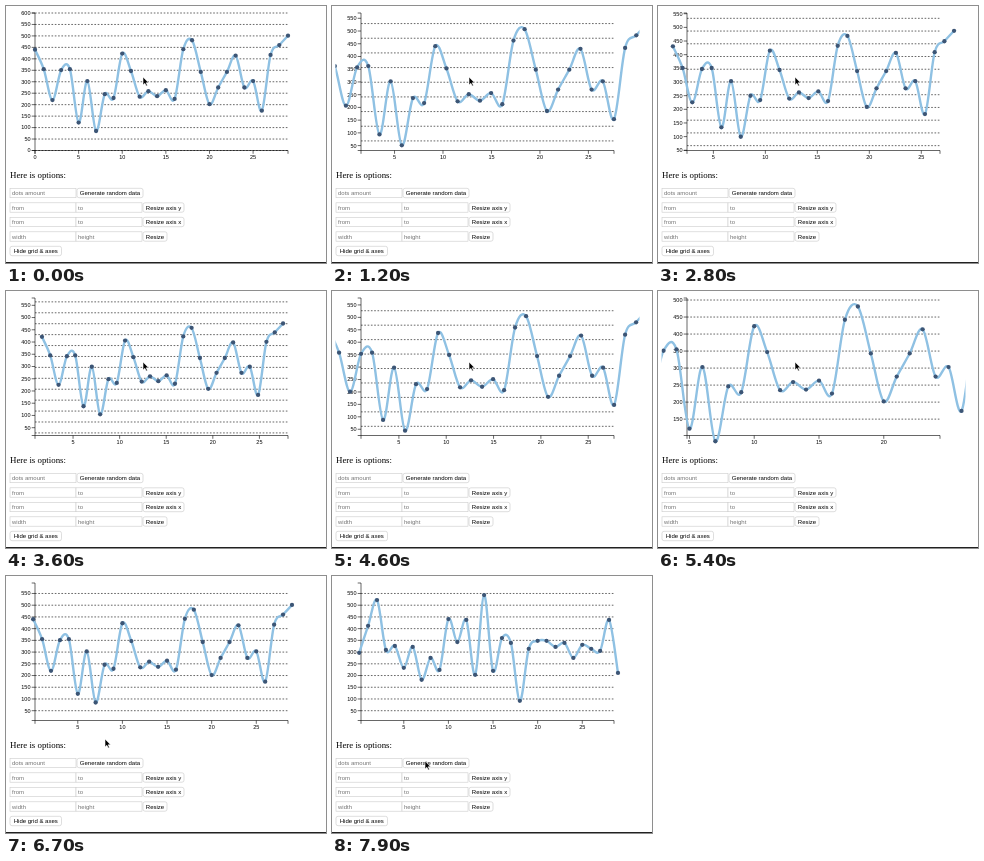
An HTML page for the animation above (8 s loop, 320 by 257 pixels).

```html
<!DOCTYPE html>
<html lang="en">
<head>
<meta charset="utf-8">
<title>Zoomable line chart</title>
<style>
  html, body { margin: 0; width: 100%; height: 100%; overflow: hidden; background: #fff; }
  svg { display: block; width: 100vw; height: 100vh; }
  text { font: 6px "Liberation Sans", Arial, sans-serif; }
  .heading { font: 8.85px "Liberation Serif", Times, serif; }
  .tick { font-size: 5.5px; }
  .input { fill: #fff; stroke: #ccc; stroke-width: .6; }
  .button { fill: #fff; stroke: #c8c8c8; stroke-width: .6; }
  .button.pressed { fill: #d4d4d4; }
  .placeholder { fill: #757575; }
  .grid { stroke: #000; stroke-width: .6; stroke-dasharray: 1.65 1.65; }
  .axis { fill: none; stroke: #000; stroke-width: .6; }
  .curve { fill: none; stroke: #8fc1e3; stroke-width: 2.4; }
  .dot { fill: #3c5575; }
</style>
</head>
<body>
<svg viewBox="0 0 320 257" preserveAspectRatio="none">
  <clipPath id="frame"><rect x="3.5" y="3" width="304" height="151"/></clipPath>
  <text class="heading" x="4" y="172">Here is options:</text>
  <g id="form"></g>
  <g id="chart" clip-path="url(#frame)"></g>
  <path id="cursor" d="M0 0V8L1.9 6.3L3.2 9L4.4 8.5L3.2 5.8H5.6Z" stroke="#fff" stroke-width=".6"/>
  <rect y="256" width="320" height="1" fill="#222"/>
</svg>
<script>
const LOOP = 8000, STEP = 100;
const LEFT = 29, RIGHT = 282, TOP = 7, BOTTOM = 144.5;
const X_MAX = 29, Y_MAX = 600;

const firstData = [440, 355, 220, 351, 355, 122, 303, 85, 246, 229, 423, 347, 235, 259, 237,
  263, 225, 442, 481, 343, 202, 275, 343, 414, 275, 303, 174, 417, 460, 501];
const lastData = [297, 412, 522, 309, 326, 233, 322, 182, 275, 224, 441, 343, 437, 203, 543,
  220, 360, 339, 92, 314, 348, 348, 322, 339, 275, 331, 314, 305, 437, 211];
const middleData = firstData.map((_, i) => 310 + 130 * Math.sin(i * i * 1.7 + 1) + 70 * Math.sin(i * 2.3));

// Keys: time, scale, x shift, y shift. The axes trail behind the curve and grid.
const plotZoom = [
  [500, 1, 0, 0], [1500, 1.4, -65, -29.6], [2000, 1.334, -54, -24.6], [3200, 1, 1, 0],
  [3600, .953, 8.3, 4.2], [3900, .97, 5.5, 2.8], [4600, 1.261, -40.5, -18],
  [5100, 1.485, -76.4, -35.4], [5500, 1.485, -76.4, -35.4], [6300, 1.023, -2.5, -1.4]
];
const axisZoom = [
  [500, 1, 0, 0], [2000, 1.238, -38.9, -17.6], [2500, 1.238, -38.9, -17.6],
  [3600, 1.068, -10.5, -5.4], [4600, 1.085, -11.9, -6.1],
  [5400, 1.485, -76.4, -35.4], [5500, 1.485, -76.4, -35.4], [6500, 1.023, -2.5, -1.4]
];
const cursorPath = [[6400, 137, 71], [6700, 99, 163], [7100, 93, 185]];

const form = document.getElementById('form');
const chart = document.getElementById('chart');
const cursor = document.getElementById('cursor');

function sample(keys, t) {
  const next = keys.findIndex(key => key[0] > t);
  if (next === 0) return keys[0].slice(1);
  if (next < 0) return keys[keys.length - 1].slice(1);
  const a = keys[next - 1], b = keys[next];
  const p = (t - a[0]) / (b[0] - a[0]);
  return a.slice(1).map((v, i) => v + (b[i + 1] - v) * p);
}

function scales([k, dx, dy]) {
  return {
    x: v => (LEFT + v / X_MAX * (RIGHT - LEFT)) * k + dx,
    y: v => (BOTTOM - v / Y_MAX * (BOTTOM - TOP)) * k + dy
  };
}

function ticks(scale, step, max, low, high) {
  const result = [];
  for (let v = 0; v <= max; v += step) {
    const at = scale(v);
    if (at >= low - .1 && at <= high + .1) result.push([v, at]);
  }
  return result;
}

// Cardinal spline with zero tension
function curve(points) {
  const at = i => points[Math.max(0, Math.min(points.length - 1, i))];
  const control = (i, sign) => at(i).map((v, c) => v + sign * (at(i + 1)[c] - at(i - 1)[c]) / 6);
  return 'M' + points[0] + points.slice(1)
    .map((p, i) => `C${control(i, 1)} ${control(i + 1, -1)} ${p}`).join('');
}

function drawChart(data, plot, axis) {
  const points = data.map((v, i) => [plot.x(i), plot.y(v)]);
  const xTicks = ticks(axis.x, 5, 30, LEFT, RIGHT);
  const yTicks = ticks(axis.y, 50, Y_MAX, TOP, BOTTOM);
  let axes = `M${LEFT - 3.3} ${TOP}H${LEFT}V${BOTTOM}H${LEFT - 3.3}`
    + `M${LEFT} ${BOTTOM + 3.3}V${BOTTOM}H${RIGHT}v3.3`;
  let out = ticks(plot.y, 50, Y_MAX, TOP, BOTTOM)
    .map(([, y]) => `<path class="grid" d="M${LEFT} ${y}H${RIGHT}"/>`).join('');
  for (const [v, x] of xTicks) {
    axes += `M${x} ${BOTTOM}v3.3`;
    out += `<text class="tick" x="${x}" y="153" text-anchor="middle">${v}</text>`;
  }
  for (const [v, y] of yTicks) {
    axes += `M${LEFT} ${y}h-3.3`;
    out += `<text class="tick" x="24.5" y="${y + 1.9}" text-anchor="end">${v}</text>`;
  }
  out += `<path class="axis" d="${axes}"/><path class="curve" d="${curve(points)}"/>`;
  out += points.map(([x, y]) => `<circle class="dot" cx="${x}" cy="${y}" r="2.15"/>`).join('');
  chart.innerHTML = out;
}

function input(x, y, label) {
  return `<rect class="input" x="${x}" y="${y - 4.7}" width="66" height="9.4"/>`
    + `<text class="placeholder" x="${x + 2}" y="${y + 2}">${label}</text>`;
}

function button(x, y, width, label) {
  return `<rect class="button" x="${x}" y="${y - 4.7}" width="${width}" height="9.4" rx="2"/>`
    + `<text x="${x + width / 2}" y="${y + 2}" text-anchor="middle">${label}</text>`;
}

form.innerHTML = input(4, 187, 'dots amount') + button(71, 187, 66, 'Generate random data')
  + input(4, 201.5, 'from') + input(70, 201.5, 'to') + button(137, 201.5, 41, 'Resize axis y')
  + input(4, 216, 'from') + input(70, 216, 'to') + button(137, 216, 41, 'Resize axis x')
  + input(4, 230.5, 'width') + input(70, 230.5, 'height') + button(137, 230.5, 24, 'Resize')
  + button(4, 245, 51.5, 'Hide grid &amp; axes');
const generate = form.querySelector('.button');

function render(t) {
  const data = t < 7500 ? firstData : t < 7900 ? middleData : lastData;
  drawChart(data, scales(sample(plotZoom, t)), scales(sample(axisZoom, t)));
  generate.classList.toggle('pressed', t === 7400 || t === 7800);
  cursor.setAttribute('transform', `translate(${sample(cursorPath, t)})`);
}

const start = performance.now();
function tick() {
  const t = (performance.now() - start) % LOOP;
  render(Math.floor(t / STEP) * STEP);
  requestAnimationFrame(tick);
}
tick();
</script>
</body>
</html>
```
